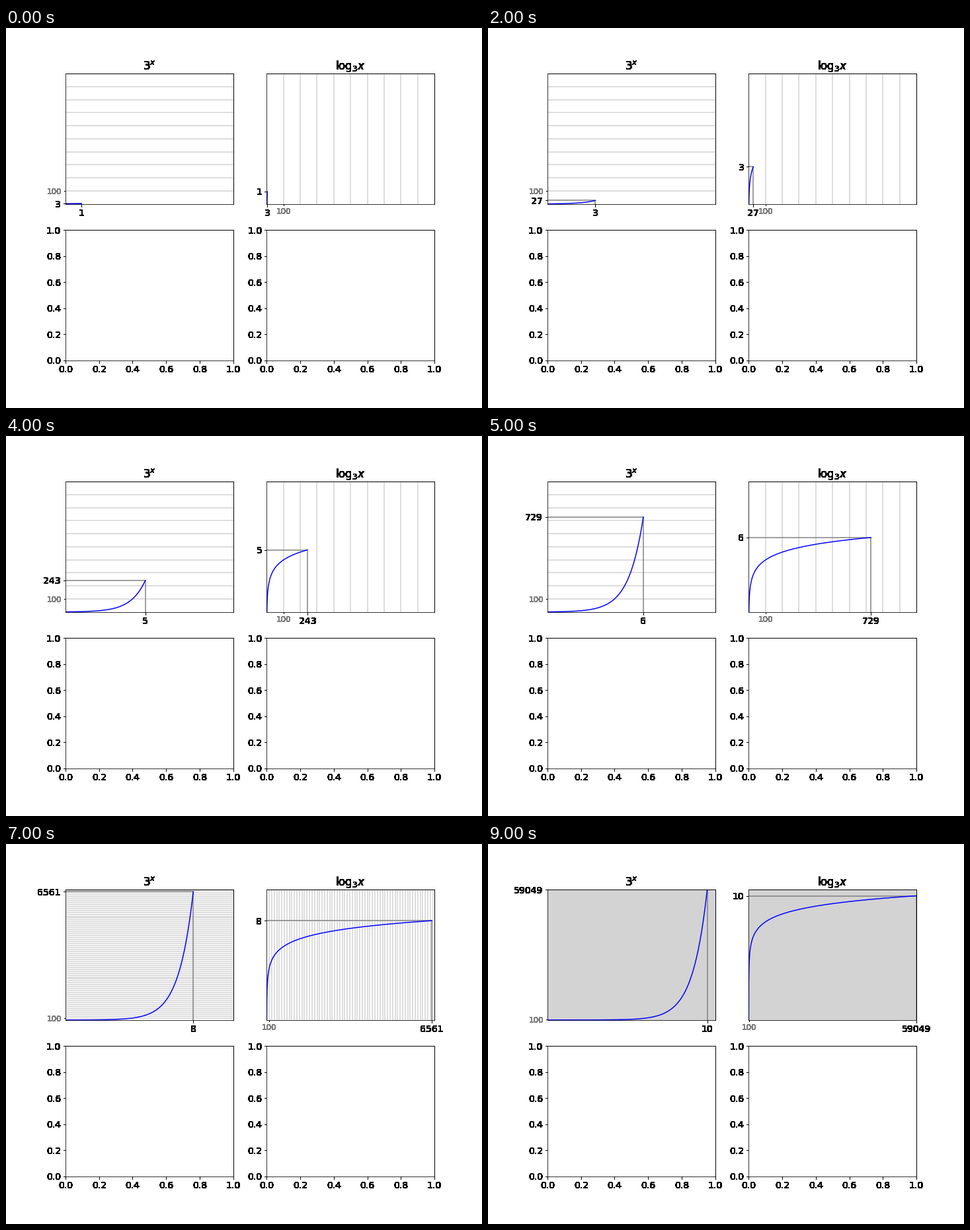
Recreate the animation shown at these times as a matplotlib script. Size 720 by 576 pixels, loop 10000 ms.

```python
import matplotlib.pyplot as plt
import numpy as np
from matplotlib.animation import FuncAnimation

BASE, STEPS, GRID = 3, 10, 100
X_MAX = 10.5

plt.rcParams.update({
    "font.family": "DejaVu Sans",
    "font.size": 14,
    "lines.linewidth": 1.5,
    "figure.subplot.left": 0.125,
    "figure.subplot.right": 0.9,
    "figure.subplot.bottom": 0.125,
    "figure.subplot.top": 0.88,
    "figure.subplot.wspace": 0.2,
    "figure.subplot.hspace": 0.2,
})

fig, axes = plt.subplots(2, 2, figsize=(10, 8), dpi=72, facecolor="white")
(exp_ax, log_ax), empty_axes = axes


def harden(im, dpi):
    """Make every touched pixel opaque, for hard-edged labels and ticks."""
    out = im.copy()
    out[..., 3] = im[..., 3] > 0
    return out, 0, 0


def harden_frame(ax):
    parts = [ax.title, ax.spines["top"], ax.spines["right"]]
    for axis in (ax.xaxis, ax.yaxis):
        for tick in axis.get_major_ticks() + axis.get_minor_ticks():
            parts += [tick.label1, tick.tick1line]
    for part in parts:
        part.set_agg_filter(harden)


def set_value_axis(axis, value):
    axis.set_ticks([value], labels=[str(value)])
    axis.set_ticks([GRID], labels=[str(GRID)], minor=True)
    axis.set_tick_params(which="minor", labelsize=12, labelcolor="gray")


def draw_panel(ax, title, x, y, guides):
    ax.set_title(title)
    for guide in guides:
        ax.plot(*guide, color="gray", solid_capstyle="butt")
    ax.plot(x, y, color="blue")
    harden_frame(ax)


def update(i):
    n = i + 1
    value = BASE ** n
    top = max(1000, value + GRID)
    levels = np.arange(GRID, top, GRID)
    t = np.linspace(0, n, 200)
    power = BASE ** t
    across = ([0, n], [value, value])
    down = ([n, n], [0, value])

    exp_ax.cla()
    exp_ax.set(xlim=(0, X_MAX), ylim=(0, top))
    exp_ax.hlines(levels, 0, X_MAX, color="lightgray")
    exp_ax.set_xticks([n], labels=[str(n)])
    set_value_axis(exp_ax.yaxis, value)
    draw_panel(exp_ax, r"$3^x$", t, power, [across, down])

    log_ax.cla()
    log_ax.set(xlim=(0, top), ylim=(0, X_MAX))
    log_ax.vlines(levels, 0, X_MAX, color="lightgray")
    log_ax.set_yticks([n], labels=[str(n)])
    set_value_axis(log_ax.xaxis, value)
    draw_panel(log_ax, r"$\mathrm{log}_3 x$", power, t,
               [across[::-1], down[::-1]])


for ax in empty_axes:
    marks = np.linspace(0, 1, 6)
    names = [f"{m:.1f}" for m in marks]
    ax.set(xlim=(0, 1), ylim=(0, 1))
    ax.set_xticks(marks, labels=names)
    ax.set_yticks(marks, labels=names)
    harden_frame(ax)

anim = FuncAnimation(fig, update, frames=STEPS, interval=1000,
                     repeat=True, repeat_delay=0, blit=False)
plt.show()
```
